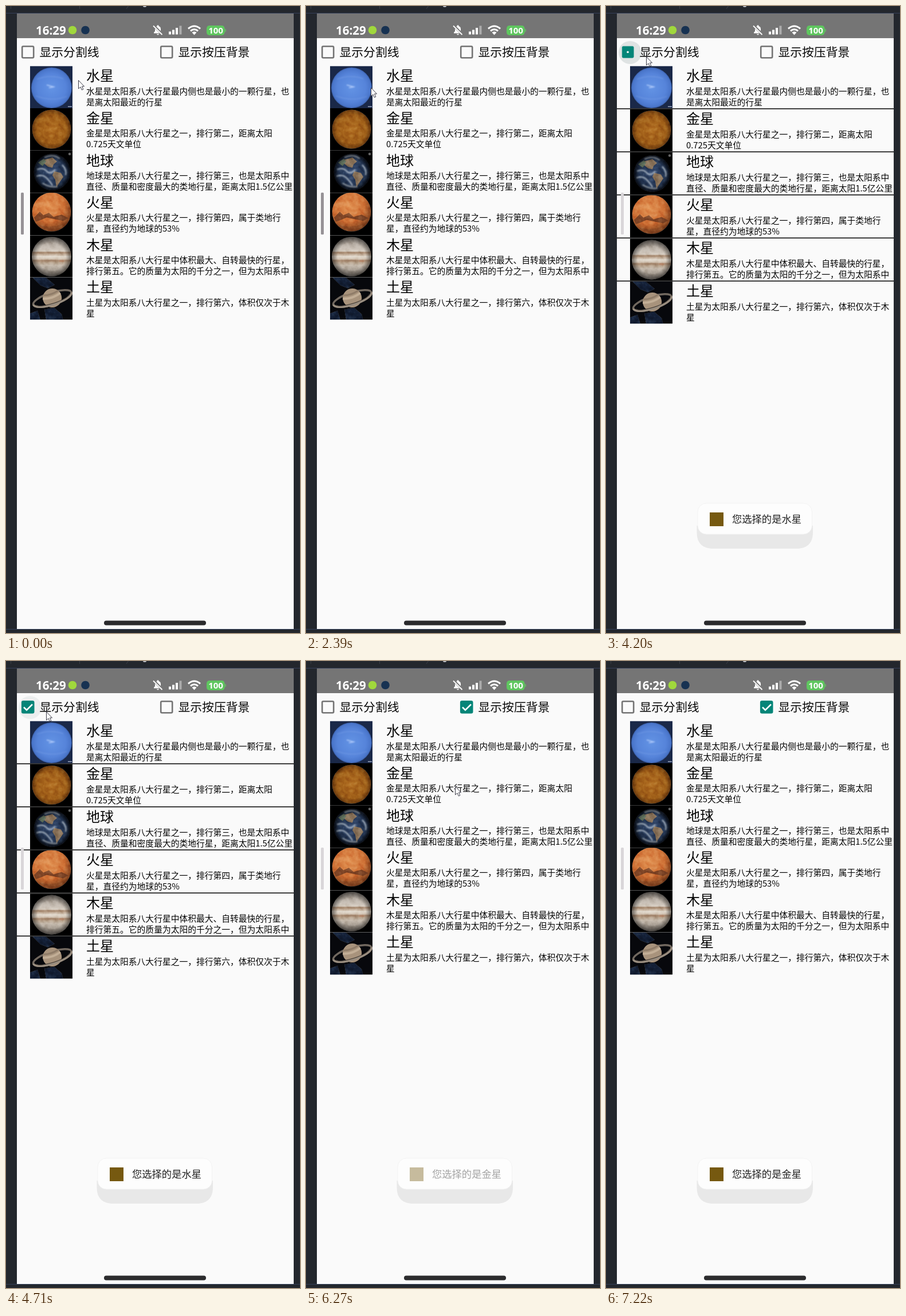
Recreate the animation shown at these times as an HTML page. Size 513 by 1092 pixels, loop 7.24 s.

```html
<!DOCTYPE html>
<html lang="zh-CN">
<head>
<meta charset="utf-8">
<title>行星列表</title>
<style>
  html, body { margin: 0; width: 100%; height: 100%; overflow: hidden; background: #23272d; }
  svg { display: block; width: 100%; height: 100%; }
  text { font-family: "Noto Sans CJK SC", "Noto Sans CJK", "Noto Sans", sans-serif; fill: #050505; white-space: pre; }
  .title { font-size: 24px; }
  .desc { font-size: 14.77px; }
  .option { font-size: 20.8px; }
  .toast { font-size: 17.3px; fill: #222; }
  .clock { font: 600 20.5px "Noto Sans", sans-serif; fill: #fff; }
  .charge { font: 700 15px "Noto Sans", sans-serif; fill: #fff; }
</style>
</head>
<body>
<svg id="stage" viewBox="0 0 513 1092">
  <defs>
    <filter id="mottle" x="0" y="0" width="1" height="1" color-interpolation-filters="sRGB">
      <feTurbulence type="fractalNoise" baseFrequency=".12" numOctaves="4" seed="5"/>
      <feColorMatrix values=".5 0 0 0 .24  .5 0 0 0 .24  .5 0 0 0 .24  0 0 0 0 1"/>
      <feBlend in2="SourceGraphic" mode="soft-light"/>
      <feComposite in2="SourceGraphic" operator="in"/>
    </filter>
    <filter id="soft"><feGaussianBlur stdDeviation="1.2"/></filter>
    <radialGradient id="blue"><stop offset="0" stop-color="#6393e4"/><stop offset=".7" stop-color="#5684da"/><stop offset=".93" stop-color="#4a76cb"/><stop offset="1" stop-color="#3a5fa8"/></radialGradient>
    <radialGradient id="amber"><stop offset="0" stop-color="#b06c20"/><stop offset=".75" stop-color="#a06019"/><stop offset="1" stop-color="#68380d"/></radialGradient>
    <radialGradient id="ocean"><stop offset="0" stop-color="#344a70"/><stop offset=".8" stop-color="#22334f"/><stop offset="1" stop-color="#0e1524"/></radialGradient>
    <radialGradient id="rust" cx=".42" cy=".35" r=".68"><stop offset="0" stop-color="#e39555"/><stop offset=".6" stop-color="#cf7236"/><stop offset="1" stop-color="#6b3416"/></radialGradient>
    <radialGradient id="shade"><stop offset=".7" stop-opacity="0"/><stop offset="1" stop-opacity=".5"/></radialGradient>
    <linearGradient id="bands" x2="0" y2="1">
      <stop offset="0" stop-color="#8d857d"/><stop offset=".2" stop-color="#b9b0a6"/>
      <stop offset=".36" stop-color="#d6cdc2"/><stop offset=".4" stop-color="#a88a70"/>
      <stop offset=".46" stop-color="#c9b7a4"/><stop offset=".5" stop-color="#e2dace"/>
      <stop offset=".56" stop-color="#d3c5b5"/><stop offset=".6" stop-color="#a5866c"/>
      <stop offset=".66" stop-color="#bba893"/><stop offset=".72" stop-color="#c9beb1"/>
      <stop offset="1" stop-color="#7c746c"/>
    </linearGradient>
    <clipPath id="tile"><path d="M0 0H74V73.7H0Z"/></clipPath>
    <clipPath id="globe"><circle cx="38.5" cy="37.5" r="32"/></clipPath>
  </defs>

  <path fill="#23272d" d="M0 0H513V1092H0Z"/>
  <path fill="#35405a" d="M0 12H513V13H0ZM0 1085H513V1086H0Z"/>
  <path stroke="#3a3f47" d="M8.5 0V5M128.5 0V5M213.5 0L210 5"/>
  <ellipse cx="242" cy="0" rx="3" ry="2" fill="#b8bbc0"/>
  <path fill="#fafafa" d="M19 13H502V1085H19Z"/>
  <path fill="#757575" d="M19 13H502V56H19Z"/>

  <text class="clock" x="52" y="50">16:29</text>
  <circle cx="116" cy="42" r="7.3" fill="#a0d83c"/>
  <circle cx="138.5" cy="42" r="7.3" fill="#173252"/>
  <g fill="#fff">
    <path d="M258 47.5H272V46L270 44V40Q270 36 266.4 35.2V33.5H263.6V35.2Q260 36 260 40V44L258 46ZM263 48.7H267Q266.7 50.5 265 50.5T263 48.7Z"/>
    <path fill="none" stroke="#757575" stroke-width="4" d="M257.5 34L273.5 50"/>
    <path fill="none" stroke="#fff" stroke-width="1.8" d="M257 34.5L272.5 50"/>
    <path d="M284 44.5h4v5h-4ZM290 41.5h4v8h-4ZM296 38h4v11.5h-4Z"/>
    <path opacity=".4" d="M302.5 34.5h4v15h-4Z"/>
  </g>
  <g fill="none" stroke="#fff" stroke-width="3">
    <path d="M318 39.5Q328.5 30.5 339 39.5M322 43.5Q328.5 38 335 43.5"/>
    <path fill="#fff" stroke="none" d="M324.5 46Q328.5 43 332.5 46L328.5 50.5Z"/>
  </g>
  <rect x="350" y="34" width="31.5" height="17" rx="5" fill="#5fc65f"/>
  <path fill="#5fc65f" d="M382.3 39.5Q384 40 384 42.5T382.3 45.5Z"/>
  <text class="charge" x="366" y="47.8" text-anchor="middle">100</text>

  <g id="options"></g>
  <g id="list"></g>
  <rect id="thumb" x="26" y="325" width="5" height="73" rx="1.5"/>

  <g id="toast">
    <path fill="#e8e8e8" d="M158.5 905H361V917C361 936 350 945 333 945H187C169 945 158.5 936 158.5 917Z"/>
    <rect x="160" y="866" width="199.5" height="54" rx="15" fill="#fdfdfd" stroke="#f0f0f0" stroke-width=".8"/>
    <g id="message">
      <rect x="181" y="882" width="24" height="24" fill="#765910"/>
      <text id="words" class="toast" x="220" y="900"></text>
    </g>
  </g>
  <rect x="171" y="1070.5" width="178" height="8" rx="4" fill="#2b2b2d"/>
  <path id="cursor" fill="#fff" stroke="#3b3b48" stroke-width="1" stroke-linejoin="round" d="M.5 .5V15L4 12L6.3 17.2L8.8 16.1L6.5 11H10.5Z"/>
</svg>
<script>
const $ = id => document.getElementById(id);
const LOOP = 7240, LIST_TOP = 104.5, ROW = 73.6, SPACED_ROW = 75;

const disc = (cy, r, fill) => `<circle cx="37.5" cy="${cy}" r="${r}" fill="${fill}"/>`;
const mottled = art => `<g filter="url(#mottle)">${art}</g>`;

const planets = [
  {
    name: '水星', sky: '#1a2848',
    lines: ['水星是太阳系八大行星最内侧也是最小的一颗行星，也', '是离太阳最近的行星'],
    art: disc(38, 35.5, 'url(#blue)') +
      `<g filter="url(#soft)" fill="none" stroke="#b4cdfb" stroke-width="1.6"><path d="M29 33L40 36M33 38L43 36"/>
       <path opacity=".2" d="M12 23Q35 14 58 22M10 52Q38 63 64 53"/></g><path fill="#9aa5bd" d="M66 70h7v1.5h-7Z"/>`
  },
  {
    name: '金星', sky: '#000',
    lines: ['金星是太阳系八大行星之一，排行第二，距离太阳', '0.725天文单位'],
    art: mottled(disc(36.5, 34, 'url(#amber)'))
  },
  {
    name: '地球', sky: '#000',
    lines: ['地球是太阳系八大行星之一，排行第三，也是太阳系中', '直径、质量和密度最大的类地行星，距离太阳1.5亿公里'],
    art: '<g clip-path="url(#globe)">' + mottled(`<circle cx="38.5" cy="37.5" r="32" fill="url(#ocean)"/>
      <path fill="#8b745b" d="M21 17L39 12L47 19L41 24L39 30L31 28L25 23ZM42 36L54 39L58 46L51 56L46 64L44 51L39 43Z"/>
      <path fill="#5b6c58" d="M14 21L24 14L28 19L22 27Z"/>`) +
      `<path filter="url(#soft)" fill="none" stroke="#cfd8e0" stroke-width="2.5" opacity=".7" d="M25 12Q40 5 52 14M12 33Q23 29 29 36T44 33M11 45Q22 40 30 49T39 61M56 25Q65 34 62 43M22 57Q34 65 48 63"/>
      <circle cx="38.5" cy="37.5" r="32" fill="url(#shade)"/></g><circle cx="69" cy="6" r="2.2" fill="#666"/>`
  },
  {
    name: '火星', sky: '#000',
    lines: ['火星是太阳系八大行星之一，排行第四，属于类地行', '星，直径约为地球的53%'],
    art: mottled(disc(33.5, 34, 'url(#rust)') +
      `<path fill="#65351f" opacity=".75" d="M7 43L17 33L23 39L33 35L41 42L55 38L67 44L58 49L43 46L29 43L15 49L10 50Z"/>
       <path fill="#8a4a26" opacity=".7" d="M14 56L31 59L47 58L60 54Q50 66 38 66Q23 66 14 56Z"/>`)
  },
  {
    name: '木星', sky: '#000',
    lines: ['木星是太阳系八大行星中体积最大、自转最快的行星，', '排行第五。它的质量为太阳的千分之一，但为太阳系中'],
    art: '<path fill="#555" d="M0 0H74V1H0Z"/>' + mottled(disc(37.5, 34.5, 'url(#bands)') +
      '<ellipse cx="55" cy="45" rx="4.5" ry="2" fill="#ad7f62"/>') + disc(37.5, 34.5, 'url(#shade)')
  },
  {
    name: '土星', sky: '#07080c',
    lines: ['土星为太阳系八大行星之一，排行第六，体积仅次于木', '星'],
    art: mottled('<path fill="#142037" d="M4 0H27L43 13L31 19L18 14ZM25 56L42 53L55 64L58 74H28ZM0 63L13 58L18 74H0Z"/>') +
      `<g transform="rotate(-18 39 37)" fill="none">
        <ellipse cx="39" cy="37" rx="35" ry="10.5" stroke="#71685f" stroke-width="3.5"/>
        <circle cx="39" cy="36" r="16.5" fill="#a8937c"/>
        <path stroke="#c2ae96" stroke-width="4" d="M23 32Q39 38 55 32"/>
        <path stroke="#8f7c68" stroke-width="3" d="M26 27Q39 31 52 27"/>
        <path stroke="#998d7f" stroke-width="3.5" d="M4 37C6 51 72 51 74 37"/>
        <path stroke="#3c352f" d="M8 38C13 48 65 48 70 38"/>
      </g>`
  }
];

$('list').innerHTML = planets.map(({ name, sky, lines, art }, i) => `<g>
  <g transform="translate(42 0)" clip-path="url(#tile)"><path fill="${sky}" d="M0 0H74V74H0Z"/>${art}</g>
  <text class="title" x="140" y="25.8">${name}</text>
  ${lines.map((line, n) => `<text class="desc" x="140" y="${49 + n * 19}">${line}</text>`).join('')}
  ${i < 5 ? '<path class="divider" d="M19 73.8H502V75.2H19Z"/>' : ''}
</g>`).join('');

const option = (x, label, rippleX, rippleR) => `<g>
  <circle class="ripple" cx="${rippleX}" cy="81" r="${rippleR}" fill="#dfe3e3"/>
  <rect class="box" x="${x + 1.2}" y="70.2" width="20" height="20" rx="2"/>
  <circle class="dot" cx="${x + 11}" cy="80.2" r="1.8" fill="#fff"/>
  <path class="tick" fill="none" stroke="#fff" stroke-width="2.5" d="M${x + 4} 80.5l5 5l10 -10"/>
  <text class="option" x="${x + 31.5}" y="88">${label}</text>
</g>`;
$('options').innerHTML = option(27, '显示分割线', 42, 20) + option(269, '显示按压背景', 279, 23);

// Each track is a list of [start time, value, ...], held until the next step.
const tracks = {
  cursor: [[0, 126, 129], [150, 124, 133], [460, 120, 137], [580, 116, 140], [700, 113, 142],
    [2540, 110, 142], [2690, 106, 142], [2990, 102, 142], [3930, 96, 126], [4080, 78, 100], [4200, 70, 88],
    [5010, 100, 88], [5130, 205, 87], [5280, 277, 85], [5400, 257, 227], [5550, 258, 222],
    [5700, 260, 218], [6540, -50, 0]],
  thumb: [[0, '#969296'], [2540, '#b8b5b8'], [2690, '#d9d6d9']],
  spaced: [[0, false], [4200, true], [4860, false]],
  toast: [[0, 0], [3800, .4], [3930, 1], [5850, .4], [5970, 0], [6270, .4], [6400, 1]],
  words: [[0, '您选择的是水星'], [6270, '您选择的是金星']],
  checks: [
    [[0, 0], [4200, 1], [4350, 2], [4860, 1], [5010, 0]],
    [[0, 0], [5400, 1], [5550, 2]]
  ],
  ripples: [
    [[0, 0], [4080, .5], [4200, 1], [4350, .5], [4470, 0], [4710, .5], [4860, 1], [5010, .4], [5130, 0]],
    [[0, 0], [5280, .5], [5400, 1], [5550, .5], [5700, 0]]
  ]
};
const at = (track, t) => track.findLast(step => step[0] <= t).slice(1);

const show = (node, on) => node.setAttribute('visibility', on ? 'visible' : 'hidden');

function drawOption(node, i, t) {
  const [check] = at(tracks.checks[i], t);
  const part = name => node.querySelector('.' + name);
  const box = part('box');
  box.setAttribute('fill', check ? '#048578' : 'none');
  box.setAttribute('stroke', check ? '#048578' : '#747474');
  box.setAttribute('stroke-width', check === 1 ? .6 : 2.6);
  part('ripple').setAttribute('opacity', at(tracks.ripples[i], t)[0]);
  show(part('dot'), check === 1);
  show(part('tick'), check === 2);
}

function draw(t) {
  $('cursor').setAttribute('transform', `translate(${at(tracks.cursor, t)})`);
  $('thumb').setAttribute('fill', at(tracks.thumb, t)[0]);

  const [spaced] = at(tracks.spaced, t);
  [...$('list').children].forEach((row, i) => {
    row.setAttribute('transform', `translate(0 ${LIST_TOP + i * (spaced ? SPACED_ROW : ROW)})`);
    const divider = row.querySelector('.divider');
    if (divider) show(divider, spaced);
  });

  [...$('options').children].forEach((node, i) => drawOption(node, i, t));

  const [opacity] = at(tracks.toast, t);
  show($('toast'), opacity > 0);
  $('message').setAttribute('opacity', opacity);
  $('words').textContent = at(tracks.words, t)[0];
}

const start = performance.now();
function frame() {
  draw((performance.now() - start) % LOOP);
  requestAnimationFrame(frame);
}
frame();
</script>
</body>
</html>
```
